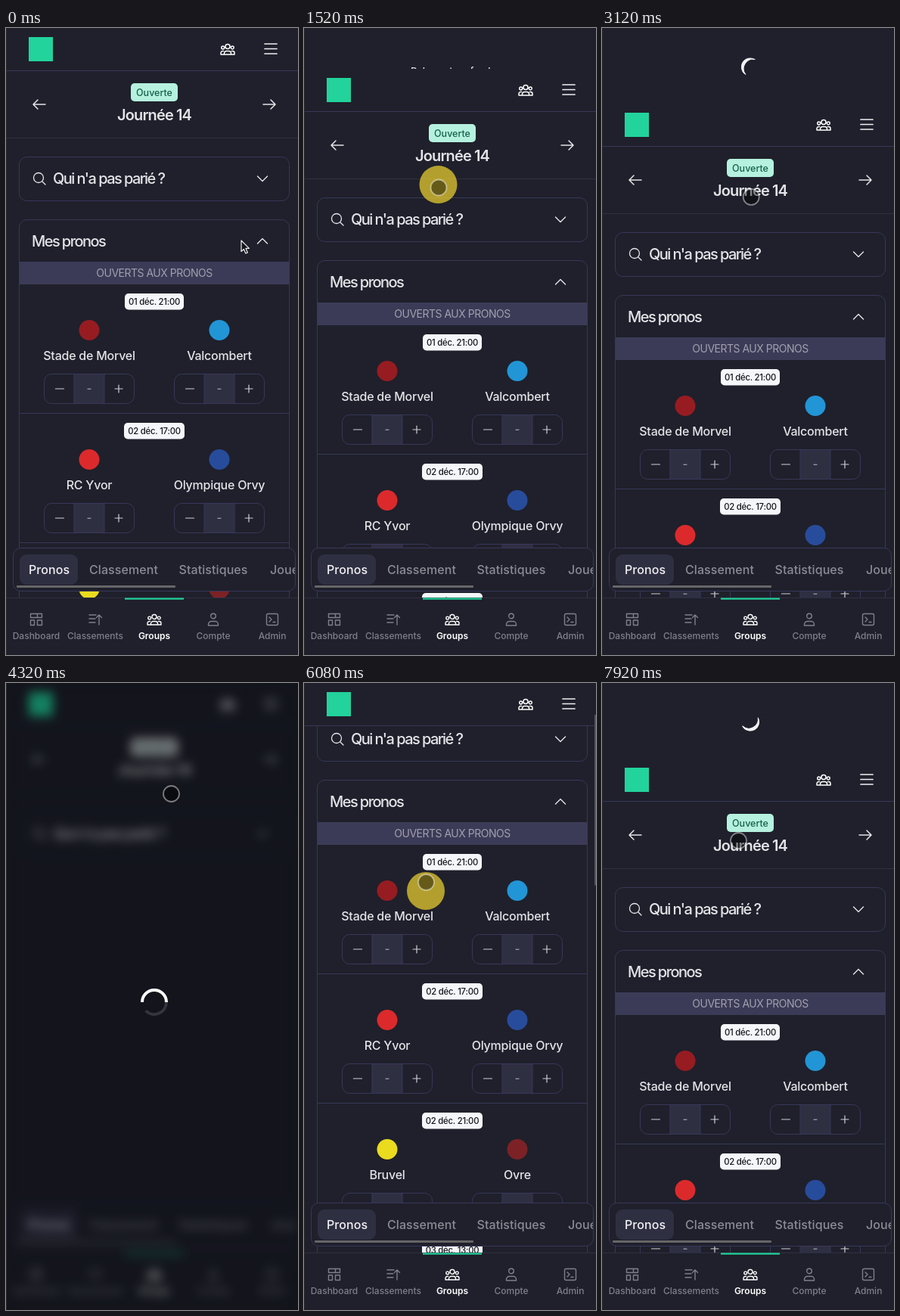
An HTML page for the animation above (8000 ms loop, 386 by 829 pixels).

```html
<!DOCTYPE html>
<html lang="fr">
<head>
<meta charset="utf-8">
<title>Pronos</title>
<style>
  html, body { margin: 0; width: 100%; height: 100%; overflow: hidden; background: #1f202b; }
  svg { display: block; width: 386px; height: 829px; }
  text { font-family: Inter, Roboto, sans-serif; font-weight: 500; white-space: pre; }
  .loading { filter: blur(7px); }
  .loading .badge { fill: #c8c8cc; }
</style>
</head>
<body>
<svg id="stage" viewBox="0 0 386 829"></svg>
<script>
const LOOP = 8000, STEP = 80;
const BG = '#1f202b', LINE = '#38375a', CELL = '#2f2f42', GREEN = '#22d39c', INK = '#e4e4e8', DIM = '#7f7f8c';
const stage = document.getElementById('stage');

function add(parent, tag, attrs = {}) {
  const el = document.createElementNS('http://www.w3.org/2000/svg', tag);
  for (const k in attrs) el.setAttribute(k, attrs[k]);
  parent.append(el);
  return el;
}
const group = (p, x = 0, y = 0) => add(p, 'g', { transform: `translate(${x} ${y})` });
const rect = (p, x, y, width, height, fill, extra) => add(p, 'rect', { x, y, width, height, fill, ...extra });
const circle = (p, cx, cy, r, fill, extra) => add(p, 'circle', { cx, cy, r, fill, ...extra });
const move = (el, x, y) => el.setAttribute('transform', `translate(${x} ${y})`);
const show = (el, on) => el.setAttribute('visibility', on ? 'visible' : 'hidden');

// y is the middle of the capital letters
function label(p, str, x, y, size, fill, { anchor = 'middle', weight = 500, track = 0 } = {}) {
  const el = add(p, 'text', { x, y: y + size * .363, fill, 'font-size': size, 'text-anchor': anchor,
    style: `font-weight:${weight};letter-spacing:${track}em` });
  el.textContent = str;
  return el;
}
function icon(p, d, x, y, color = INK, width = 1.5) {
  return add(group(p, x, y), 'path', { d, fill: 'none', stroke: color, 'stroke-width': width,
    'stroke-linecap': 'round', 'stroke-linejoin': 'round' });
}

const ICONS = {
  group: 'M-3-3.5a3 3 0 1 0 6 0a3 3 0 1 0-6 0M-4.5 7v-1.5a3 3 0 0 1 3-3h3a3 3 0 0 1 3 3V7z' +
    'M-8.2-2a1.9 1.9 0 1 0 3.8 0a1.9 1.9 0 1 0-3.8 0M4.4-2a1.9 1.9 0 1 0 3.8 0a1.9 1.9 0 1 0-3.8 0' +
    'M-5.5 2.5h-1a2.5 2.5 0 0 0-2.5 2.5v2h4.5M5.5 2.5h1a2.5 2.5 0 0 1 2.5 2.5v2h-4.5',
  menu: 'M-8-6.5H8M-8 0H8M-8 6.5H8',
  left: 'M8 0H-8M-2-6L-8 0L-2 6',
  right: 'M-8 0H8M2-6L8 0L2 6',
  search: 'M-7.5-1a6.5 6.5 0 1 0 13 0a6.5 6.5 0 1 0-13 0M3.7 3.7L8 8',
  down: 'M-6.5-3L0 3.5L6.5-3',
  up: 'M-6.5 3L0-3.5L6.5 3',
  minus: 'M-5.5 0H5.5',
  plus: 'M-5 0H5M0-5V5',
  board: 'M-7.5-7.5h15v5h-15zM-7.5 1h5v6.5h-5zM1.5 1h6v6.5h-6zM1.5-7.5v5',
  sort: 'M-8-6H1M-8-1H0M-8 4H0M5 7V-6M1.5-2.5L5-6L8.5-2.5',
  user: 'M-3.3-4.5a3.3 3.3 0 1 0 6.6 0a3.3 3.3 0 1 0-6.6 0M-6.5 8v-1.5a4 4 0 0 1 4-4h5a4 4 0 0 1 4 4V8z',
  admin: 'M-5.5-7.5h11a2 2 0 0 1 2 2v11a2 2 0 0 1-2 2h-11a2 2 0 0 1-2-2v-11a2 2 0 0 1 2-2zM-4-3L-1 0L-4 3M1 3.5H4'
};

const MATCHES = [
  ['01 déc. 21:00', 'Stade de Morvel', '#961c22', 'Valcombert', '#2295d6', 78],
  ['02 déc. 17:00', 'RC Yvor', '#dc2a2c', 'Olympique Orvy', '#284c9c', 80],
  ['02 déc. 21:00', 'Bruvel', '#eadb1f', 'Ovre', '#7c2226', 80],
  ['03 déc. 13:00', 'Tavisse', '#3b6fb5', 'Quermont', '#b03a3a', 80]
];

function stepper(p, x, y) {
  rect(p, x + 40, y, 40, 40, CELL);
  rect(p, x + .5, y + .5, 119, 39, 'none', { rx: 10, stroke: LINE });
  icon(p, 'M40 0V40M80 0V40', x, y, LINE, 1);
  icon(p, ICONS.minus, x + 21, y + 20, '#d0d0d6', 1.2);
  icon(p, ICONS.plus, x + 99, y + 20, '#d0d0d6', 1.2);
  label(p, '-', x + 60, y + 19.5, 15, '#9696a2');
}

function match(p, [date, home, homeColor, away, awayColor, pill], y) {
  rect(p, 196 - pill / 2, y + 12, pill, 21.5, '#f5f6f9', { rx: 5 });
  label(p, date, 196, y + 22.7, 11.3, '#15161d', { track: -.02 });
  [[110, home, homeColor], [282, away, awayColor]].forEach(([x, name, color]) => {
    circle(p, x, y + 60.5, 13.5, color);
    label(p, name, x, y + 94.5, 16, INK, { track: -.015 });
    stepper(p, x - 60, y + 118);
  });
  rect(p, 18, y + 170, 356, 1, LINE);
}

const scene = add(stage, 'g');
rect(scene, 0, 0, 386, 829, BG);

// Area revealed by pulling
const hint = label(scene, 'Release to refresh', 196, 57, 13, INK, { track: -.012 });
const ptrSpin = add(group(scene, 196, 51.5), 'path', {
  d: 'M0-11.6A11.6 11.6 0 0 1 0 11.6A12.3 12.3 0 0 0 0-11.6Z', fill: '#f4f4f6',
  stroke: '#f4f4f6', 'stroke-width': .9, 'stroke-linejoin': 'round' });

// Page
const app = group(scene);
rect(app, 0, 0, 386, 900, BG);
const list = group(app);
icon(list, ICONS.left, 44, 101);
icon(list, ICONS.right, 348, 101);
rect(list, 165, 73, 62, 24, '#b5f1de', { rx: 5, class: 'badge' });
label(list, 'Ouverte', 196, 85, 12.5, '#17604c');
label(list, 'Journée 14', 196, 115, 20, INK, { weight: 600, track: -.045 });
rect(list, 0, 145, 386, 1, '#2f2f43');
rect(list, 17.5, 170.5, 357, 58, 'none', { rx: 10, stroke: LINE });
icon(list, ICONS.search, 44, 199, INK, 1.3);
label(list, "Qui n'a pas parié ?", 62, 199, 20, INK, { anchor: 'start', track: -.078 });
icon(list, ICONS.down, 339, 199, INK, 1.4);

const card = add(list, 'g');
rect(card, 17.5, 253.5, 357, 900, 'none', { rx: 10, stroke: LINE });
label(card, 'Mes pronos', 34, 282, 20, INK, { anchor: 'start', track: -.078 });
icon(card, ICONS.up, 339, 282, INK, 1.4);
rect(card, 18, 309, 356, 30, '#3c3b57');
label(card, 'OUVERTS AUX PRONOS', 196, 324, 14, '#a0a0ae', { weight: 400, track: -.035 });
MATCHES.forEach((m, i) => match(card, m, 339 + i * 171));

rect(app, 0, 0, 386, 56, BG);
rect(app, 0, 56, 386, 1, LINE);
rect(app, 30, 12, 32, 32, GREEN);
icon(app, ICONS.group, 293, 28, '#fff');
icon(app, ICONS.menu, 350, 27.5, '#f0f0f2', 1.7);

// Fixed bars at the bottom
const bars = group(scene);
rect(bars, 9.5, 687.5, 373, 57, BG, { rx: 10, stroke: LINE });
rect(bars, 18, 696, 77, 40, CELL, { rx: 9 });
const clip = add(add(stage, 'defs'), 'clipPath', { id: 'tabs' });
rect(clip, 10, 688, 372, 56);
const tabs = add(bars, 'g', { 'clip-path': 'url(#tabs)' });
[['Pronos', 30, '#f2f2f4'], ['Classement', 110, '#8b8b95'], ['Statistiques', 228.5, '#8b8b95'], ['Joueurs', 349, '#8b8b95']]
  .forEach(([s, x, c]) => label(tabs, s, x, 716, 16, c, { anchor: 'start', track: .005 }));
rect(bars, 14, 737, 210, 3, '#666668', { rx: 1 });
rect(bars, 0, 753, 386, 90, BG);
rect(bars, 0, 753, 386, 1, '#2f2f43');
rect(bars, 157, 753.5, 78, 2.2, GREEN);
[['Dashboard', 'board'], ['Classements', 'sort'], ['Groups', 'group'], ['Compte', 'user'], ['Admin', 'admin']]
  .forEach(([s, name], i) => {
    const x = 40 + i * 78, on = i === 2;
    icon(bars, ICONS[name], x, 782, on ? '#fff' : DIM, 1.4);
    label(bars, s, x, 804, 12, on ? '#fff' : DIM, { weight: on ? 600 : 500 });
  });

const thumb = rect(stage, 384, 3, 2, 226, '#55565e', { rx: 1 });

// Full-page loader
const loader = add(stage, 'g');
rect(loader, 0, 0, 386, 829, 'rgba(0,3,5,.4)');
const wheel = add(group(loader, 196, 422), 'g');
[['M16 0A16 16 0 0 1-11.3 11.3', '#34353d'], ['M-16 0A16 16 0 0 1 16 0', '#fff']]
  .forEach(([d, stroke]) => add(wheel, 'path', { d, stroke, fill: 'none', 'stroke-width': 4 }));

rect(stage, 0, 0, 1, 829, '#2b2b30');

// Pointer
const halo = circle(stage, 0, 0, 25, 'rgba(242,213,46,.7)');
const ring = circle(stage, .5, .5, 10.5, 'rgba(0,0,0,.43)', { stroke: 'rgba(255,255,255,.45)', 'stroke-width': 1.8 });
const arrow = add(stage, 'path', { d: 'M0 0V14.5L3.4 11.4L5.8 17L8.4 15.9L6 10.4H10.4Z',
  fill: '#15161b', stroke: '#f0f0f0', 'stroke-width': 1.2, 'stroke-linejoin': 'round' });

// Keys: time, then one or more values
const PULL = [[1200, 0], [1840, 107], [2160, 107], [2400, 100], [3880, 100], [4000, 0],
  [6240, 0], [6480, 112], [6560, 108], [6640, 102], [6800, 100]];
const SCROLL = [[5920, 0], [6080, 125], [6120, 135], [6240, 0]];
const POINTER = [[160, 311, 281], [960, 178, 133], [1200, 178, 136], [1840, 177, 285], [2000, 177, 288],
  [2160, 177, 288], [2960, 192, 240], [3840, 218, 146], [5040, 218, 146], [5840, 160, 390], [5920, 161, 390],
  [6080, 161, 263], [6160, 161, 246], [6480, 150, 400], [6640, 147, 344], [7600, 175, 225], [7920, 180, 208]];
const PRESSED = [[1040, 2160], [5920, 6560]];
const REFRESHING = [[2160, 4000], [6560, LOOP]];

function at(keys, t) {
  const i = keys.findIndex(k => k[0] > t);
  if (i === 0) return keys[0].slice(1);
  if (i < 0) return keys[keys.length - 1].slice(1);
  const a = keys[i - 1], b = keys[i], u = (t - a[0]) / (b[0] - a[0]);
  return a.slice(1).map((v, n) => v + (b[n + 1] - v) * u);
}
const within = (spans, t) => spans.some(([a, b]) => t >= a && t < b);

function draw(t) {
  const [pull] = at(PULL, t), [scroll] = at(SCROLL, t);
  const busy = within(REFRESHING, t), loading = t >= 4160 && t < 4560;

  move(app, 0, Math.round(pull));
  move(list, 0, -Math.round(scroll));
  move(bars, 0, Math.max(0, Math.round(pull) - 100));
  show(hint, !busy && pull > 0);
  show(ptrSpin, busy);
  ptrSpin.setAttribute('transform', `rotate(${(t - 6640) * 440 / 1280 - 18})`);

  scene.setAttribute('class', loading ? 'loading' : '');
  show(loader, loading);
  show(card, !loading);
  wheel.setAttribute('transform', `rotate(${(t - 4320) * .45})`);

  thumb.setAttribute('y', 3 + scroll * .31);
  thumb.setAttribute('opacity', t < 5920 ? 0 : Math.min(1, Math.max(0, (7200 - t) / 240)));

  const useArrow = t < 240;
  move(arrow, ...at(POINTER, t));
  move(ring, ...at(POINTER, t));
  move(halo, ...at(POINTER, t - 15));
  show(arrow, useArrow);
  show(ring, !useArrow);
  show(halo, within(PRESSED, t));
}

const start = performance.now();
function tick() {
  const t = (performance.now() - start) % LOOP;
  draw(Math.floor(t / STEP) * STEP);
  requestAnimationFrame(tick);
}
tick();
</script>
</body>
</html>
```
